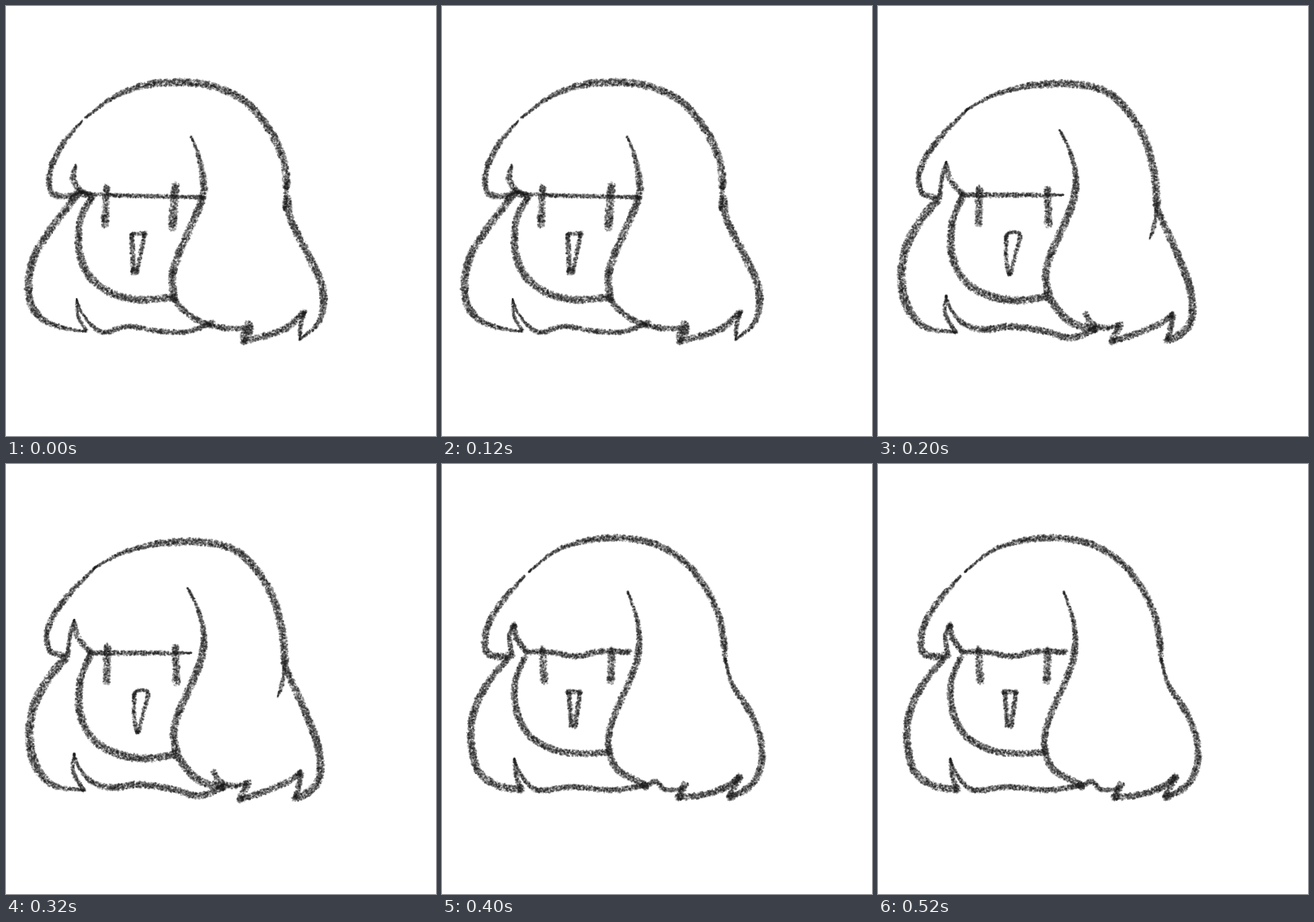
Animation, 530 px wide and 530 px high, one loop 0.6 s. Source, as an HTML page with a canvas:

```html
<!DOCTYPE html>
<html lang="en">
<head>
<meta charset="utf-8">
<title>Crayon girl</title>
<style>
html, body { margin: 0; width: 100%; height: 100%; overflow: hidden; background: #fff; }
canvas { display: block; }
</style>
</head>
<body>
<canvas id="stage" width="530" height="530"></canvas>
<script>
const SIZE = 530, HOLD = 200;
let ctx, seed;

function random() {
  seed = (Math.imul(seed, 1664525) + 1013904223) >>> 0;
  return seed / 4294967296;
}

const spline = (a, b, c, d, t) =>
  b + t / 2 * (c - a + t * (2 * a - 5 * b + 4 * c - d + t * (3 * (b - c) + d - a)));

// Points about one pixel apart on a smooth curve through the knots.
function trace(coords) {
  const knots = [];
  for (let i = 0; i < coords.length; i += 2) knots.push([coords[i], coords[i + 1]]);
  const last = knots.length - 1, points = [];
  for (let i = 0; i < last; i++) {
    const a = knots[Math.max(0, i - 1)], b = knots[i];
    const c = knots[i + 1], d = knots[Math.min(last, i + 2)];
    const steps = Math.ceil(Math.hypot(c[0] - b[0], c[1] - b[1]));
    for (let s = 0; s < steps; s++) {
      points.push([0, 1].map(k => spline(a[k], b[k], c[k], d[k], s / steps)));
    }
  }
  points.push(knots[last]);
  return points;
}

// Crayon grain: many small translucent dots, clumped along the stroke.
function crayon(weight, tip, coords) {
  const points = trace(coords);
  let lump = 1;
  points.forEach(([x, y], i) => {
    const t = i / (points.length - 1);
    const width = weight * Math.min(1, tip + (1 - tip) * t / 0.3);
    if (i % 4 === 0) lump = 0.75 + 0.5 * random();
    const reach = Math.max(0.5, width / 2 - 0.6) * (0.9 + 0.2 * lump);
    for (let n = width * 0.95 * lump; n > 0; n--) {
      const angle = random() * 2 * Math.PI;
      const offset = reach * Math.sqrt(random());
      ctx.globalAlpha = 0.15 + 0.25 * random();
      ctx.beginPath();
      ctx.arc(x + offset * Math.cos(angle), y + offset * Math.sin(angle),
        0.6 + 0.8 * random(), 0, 2 * Math.PI);
      ctx.fill();
    }
  });
}

// A line keeps its weight; a flick starts as a thin tip.
const line = (weight, ...coords) => crayon(weight, 0.85, coords);
const flick = (weight, ...coords) => crayon(weight, 0.35, coords);

function poseA() {
  // hair outline
  flick(8, 94,142, 70,170, 55,200, 54,224, 63,234, 84,233);
  flick(10, 98,138, 130,114, 165,99, 210,94, 255,99, 295,118, 325,153, 342,190, 346,222);
  flick(7, 343,252, 346,222);
  flick(10, 362,411, 384,392, 391,368, 386,335, 353,268, 347,238);
  flick(6, 362,411, 363,395, 368,377);
  line(9, 368,377, 345,397, 318,407, 293,413);
  line(9, 293,412, 293,403, 301,402, 299,391);
  line(8, 298,397, 270,397, 240,389, 220,376, 207,361);
  flick(10, 98,401, 68,396, 42,384, 29,360, 30,325, 45,290, 90,229);
  flick(5, 87,361, 89,382, 99,400);
  flick(7, 87,361, 96,382, 118,402, 150,395, 190,401, 225,401, 254,390);
  // fringe
  flick(10, 228,161, 237,183, 243,215, 241,240, 212,308, 205,335, 207,360);
  flick(9, 86,196, 83,213, 92,229, 106,234);
  line(6, 92,230, 125,233, 245,236);
  // face
  line(10, 106,236, 92,262, 90,300, 102,332, 130,354, 165,362, 208,359);
  line(10, 124,223, 122,269);
  line(11, 209,221, 205,273);
  line(6, 155,281, 172,280);
  line(6, 171,280, 161,329);
  line(7, 155,281, 157,329);
}

function poseB() {
  // hair outline
  flick(8, 111,127, 80,158, 58,188, 50,213, 55,231, 70,236);
  flick(10, 109,128, 145,109, 190,98, 235,96, 278,104, 305,126, 328,162, 340,205, 344,246);
  flick(6, 335,287, 341,268, 344,244);
  line(10, 345,252, 374,318, 386,355, 386,388, 372,405, 356,412);
  line(8, 356,412, 361,396, 363,380);
  line(9, 363,380, 345,393, 315,405, 288,413);
  line(9, 288,413, 299,392);
  line(8, 297,393, 279,397, 263,391, 256,380);
  flick(11, 96,402, 58,396, 36,370, 29,335, 34,300, 50,268, 74,238);
  flick(6, 84,357, 83,380, 96,402);
  flick(9, 84,357, 90,374, 105,391, 130,399, 165,395, 205,401, 238,409, 270,397);
  // fringe
  flick(10, 224,153, 236,178, 244,212, 238,248, 210,315, 208,345, 218,370, 240,391, 268,398);
  flick(6, 84,192, 79,212, 76,235);
  flick(8, 84,192, 89,214, 104,232);
  flick(7, 229,233, 190,233, 104,233);
  // face
  line(10, 104,236, 92,265, 91,305, 108,340, 140,358, 175,363, 208,358);
  line(10, 125,224, 124,269);
  line(10, 209,225, 210,269);
  line(6, 158,283, 163,279, 175,282, 169,308, 162,331, 158,308, 158,283);
}

function poseC() {
  // hair outline
  flick(9, 102,138, 72,172, 55,204, 54,229, 65,237, 84,236);
  flick(9, 107,133, 140,107, 175,95, 215,91, 260,98, 298,120, 325,153, 342,190, 348,225);
  flick(7, 349,246, 348,225);
  flick(9, 349,240, 358,272, 380,306, 394,345, 391,380, 376,400, 354,411);
  line(9, 354,411, 367,385);
  line(9, 367,385, 352,397, 325,407, 291,411);
  line(9, 291,411, 300,394);
  line(7, 297,401, 275,401, 262,391, 250,400);
  line(10, 82,239, 55,272, 38,310, 36,345, 46,380, 70,397, 98,401);
  flick(7, 89,363, 92,385, 98,401);
  flick(8, 89,363, 98,384, 118,402, 160,398, 210,402, 250,396);
  // fringe
  flick(9, 229,157, 240,190, 243,220, 236,255, 208,322, 207,355, 218,378, 252,396);
  line(7, 89,197, 83,212, 87,237);
  line(8, 89,197, 92,215, 104,231);
  line(8, 104,232, 135,232, 165,237, 195,231, 231,232);
  // face
  line(9, 102,238, 90,270, 92,305, 108,335, 140,353, 175,357, 206,355);
  line(10, 124,228, 126,268);
  line(10, 209,229, 208,268);
  line(7, 155,281, 170,281);
  line(7, 156,281, 160,323);
  line(7, 170,281, 164,323);
}

function sketch(pose, index) {
  const sheet = document.createElement("canvas");
  sheet.width = sheet.height = SIZE;
  ctx = sheet.getContext("2d");
  seed = 71 + index * 997;
  ctx.fillStyle = "#fff";
  ctx.fillRect(0, 0, SIZE, SIZE);
  ctx.fillStyle = "#1c1c1c";
  pose();
  return sheet;
}

const sheets = [poseA, poseB, poseC].map(sketch);
const stage = document.getElementById("stage").getContext("2d");

function render() {
  const index = Math.floor(performance.now() / HOLD) % sheets.length;
  stage.drawImage(sheets[index], 0, 0);
  requestAnimationFrame(render);
}
render();
</script>
</body>
</html>
```
